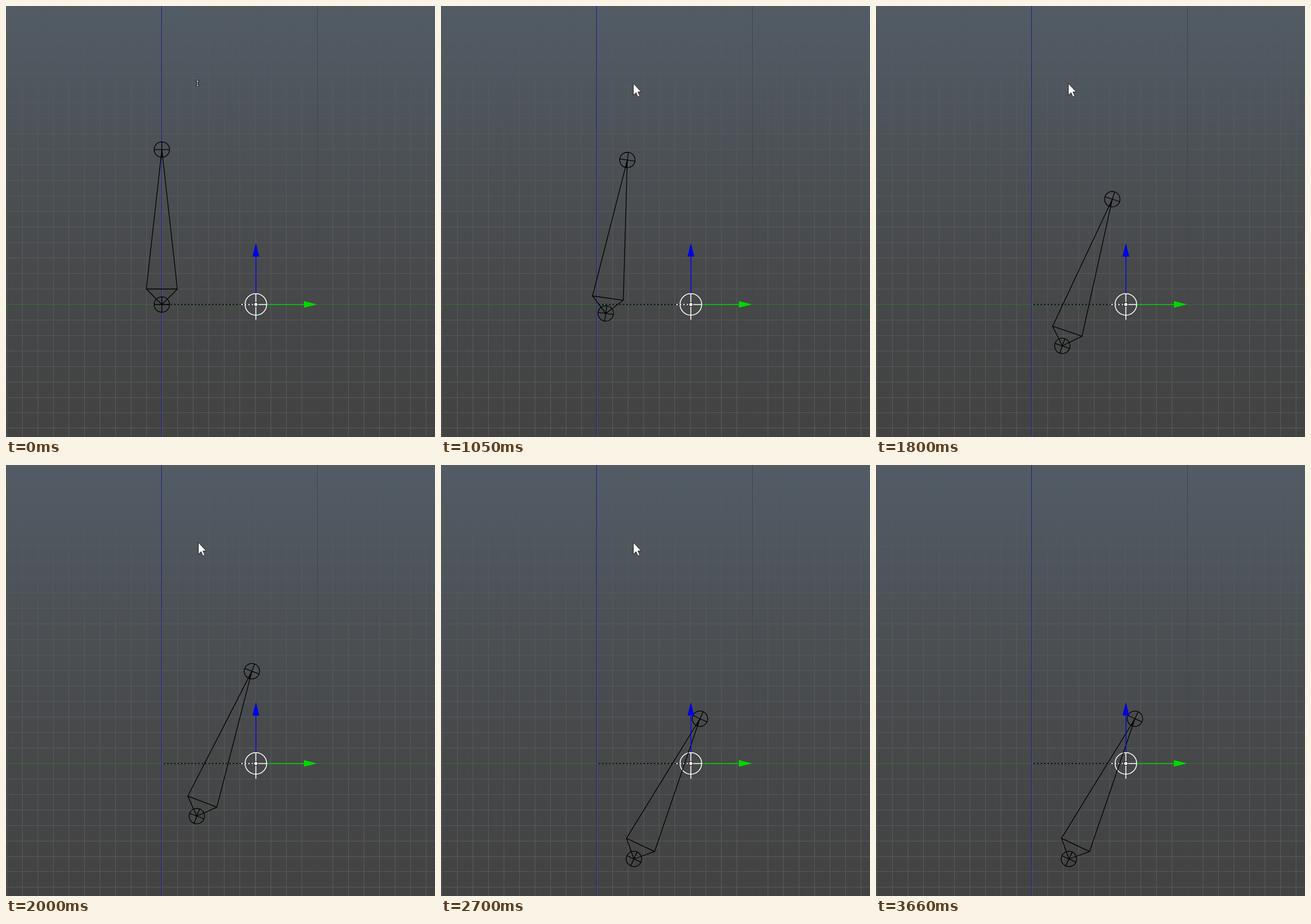
An HTML page that plays this animation: 746 px wide and 750 px high, repeating every 4000 ms.

```html
<!DOCTYPE html>
<html lang="en">
<head>
<meta charset="utf-8">
<title>Bone rotation</title>
<style>
  html, body { margin: 0; width: 100%; height: 100%; overflow: hidden; background: #474a4c; }
  svg { display: block; width: 746px; height: 750px; }
</style>
</head>
<body>
<svg viewBox="0 0 746 750" fill="none">
  <defs>
    <linearGradient id="sky" x1="0" y1="0" x2="0" y2="1">
      <stop offset="0" stop-color="#525c66"/>
      <stop offset=".25" stop-color="#4d545b"/>
      <stop offset=".5" stop-color="#494c4f"/>
      <stop offset=".75" stop-color="#454647"/>
      <stop offset="1" stop-color="#424243"/>
    </linearGradient>
    <g id="joint">
      <circle r="13.4"/>
      <path d="M-13.4 0H13.4M0 -13.4V13.4"/>
    </g>
  </defs>
  <rect width="746" height="750" fill="url(#sky)"/>
  <path id="grid" stroke="#585a59" shape-rendering="crispEdges"/>
  <g shape-rendering="crispEdges">
    <path d="M541.5 0V750" stroke="#424547"/>
    <path d="M0 519.5H746" stroke="#377037"/>
    <path d="M270.5 0V750" stroke="#1c1c94"/>
  </g>

  <g stroke="#fff" stroke-width="1.5">
    <circle cx="434.5" cy="519.3" r="18.8"/>
    <path d="M407.5 519.5H454M434.5 500V546"/>
  </g>
  <path d="M274 519.5H434" stroke="#000" stroke-width="1.3" stroke-dasharray="3 3"/>

  <g id="bone" stroke="#000" stroke-width="1.3">
    <path d="M0 0L-27 -27L0 -269.7L27 -27ZM-27 -27H27" stroke-linejoin="bevel"/>
    <use href="#joint"/>
    <use href="#joint" y="-269.7"/>
  </g>

  <path d="M434.5 500V434" stroke="#0000e6" stroke-width="1.5"/>
  <path d="M434.5 412.5L440.3 436H428.7Z" fill="#0000e6"/>
  <path d="M454 519.5H520" stroke="#00d800" stroke-width="1.5"/>
  <path d="M541 519.3L518 525V513.6Z" fill="#00d800"/>
  <circle cx="434.5" cy="519.4" r="3.5" fill="#fff" stroke="#000"/>

  <g id="beam" stroke-linecap="square">
    <path id="beamShape" d="M331.5 130.5H334.5M333 130.5V138.5M331.5 138.5H334.5" stroke="#222" stroke-width="3"/>
    <use href="#beamShape"/>
    <path d="M331.5 130.5H334.5M333 130.5V138.5M331.5 138.5H334.5" stroke="#ddd"/>
  </g>
  <path id="arrow" d="M.5 .8V21.2L5.2 16.8L8.5 24.2L11.7 22.8L8.5 15.5H14.2Z"
        fill="#fff" stroke="#222"/>
</svg>
<script>
const LOOP = 4000;
const CELL = 27;
const STEP_TIMES = [360, 490, 610, 710, 810, 940, 1050, 1150, 1250, 1360, 1480,
  1580, 1690, 1800, 1900, 2000, 2130, 2250, 2350, 2470, 2580, 2700];

// Bone path: step, head x, head y, angle in degrees
const POSES = [
  [0, 271, 519.5, 0], [3, 273, 522.5, 3], [5, 279.3, 528.3, 5.4],
  [7, 286.5, 535, 8], [10, 301.6, 552, 12.4], [14, 324, 591.5, 18.8],
  [16, 331.8, 611, 20.8], [18, 335, 631.5, 22.6], [21, 335.7, 675, 25],
  [22, 335.5, 685.5, 25.2]
];

// Pointer places: start time, x, y
const POINTER = [[220, 334, 134], [3460, 309, 228], [3560, 251, 265]];
const POINTER_END = 3660;

const byId = id => document.getElementById(id);
const bone = byId('bone'), beam = byId('beam'), arrow = byId('arrow');

function drawGrid() {
  let d = '';
  for (let i = -10; i <= 17; i++) d += `M${Math.floor(271 + i * CELL) + .5} 0V750`;
  for (let i = -19; i <= 8; i++) d += `M0 ${Math.floor(519.3 + i * 26.95) + .5}H746`;
  byId('grid').setAttribute('d', d + 'M0 .5H746');
}

function slope(i, k) {
  const a = POSES[Math.max(i - 1, 0)];
  const b = POSES[Math.min(i + 1, POSES.length - 1)];
  return (b[k] - a[k]) / (b[0] - a[0]);
}

function poseAt(step) {
  let i = 0;
  while (i < POSES.length - 2 && POSES[i + 1][0] <= step) i++;
  const a = POSES[i], b = POSES[i + 1];
  const span = b[0] - a[0], u = (step - a[0]) / span;
  const ease = u * u * (3 - 2 * u);
  return [1, 2, 3].map(k =>
    a[k] + (b[k] - a[k]) * ease +
    span * u * (1 - u) * ((1 - u) * slope(i, k) - u * slope(i + 1, k)));
}

function render(time) {
  const step = STEP_TIMES.filter(t => t <= time).length;
  const [x, y, angle] = poseAt(step);
  bone.setAttribute('transform', `translate(${x} ${y}) rotate(${angle})`);

  const place = POINTER.filter(p => p[0] <= time).pop();
  beam.style.display = place ? 'none' : '';
  arrow.style.display = place && time < POINTER_END ? '' : 'none';
  if (place) arrow.setAttribute('transform', `translate(${place[1]} ${place[2]})`);
}

drawGrid();
const start = performance.now();
function tick() {
  render((performance.now() - start) % LOOP);
  requestAnimationFrame(tick);
}
tick();
</script>
</body>
</html>
```
